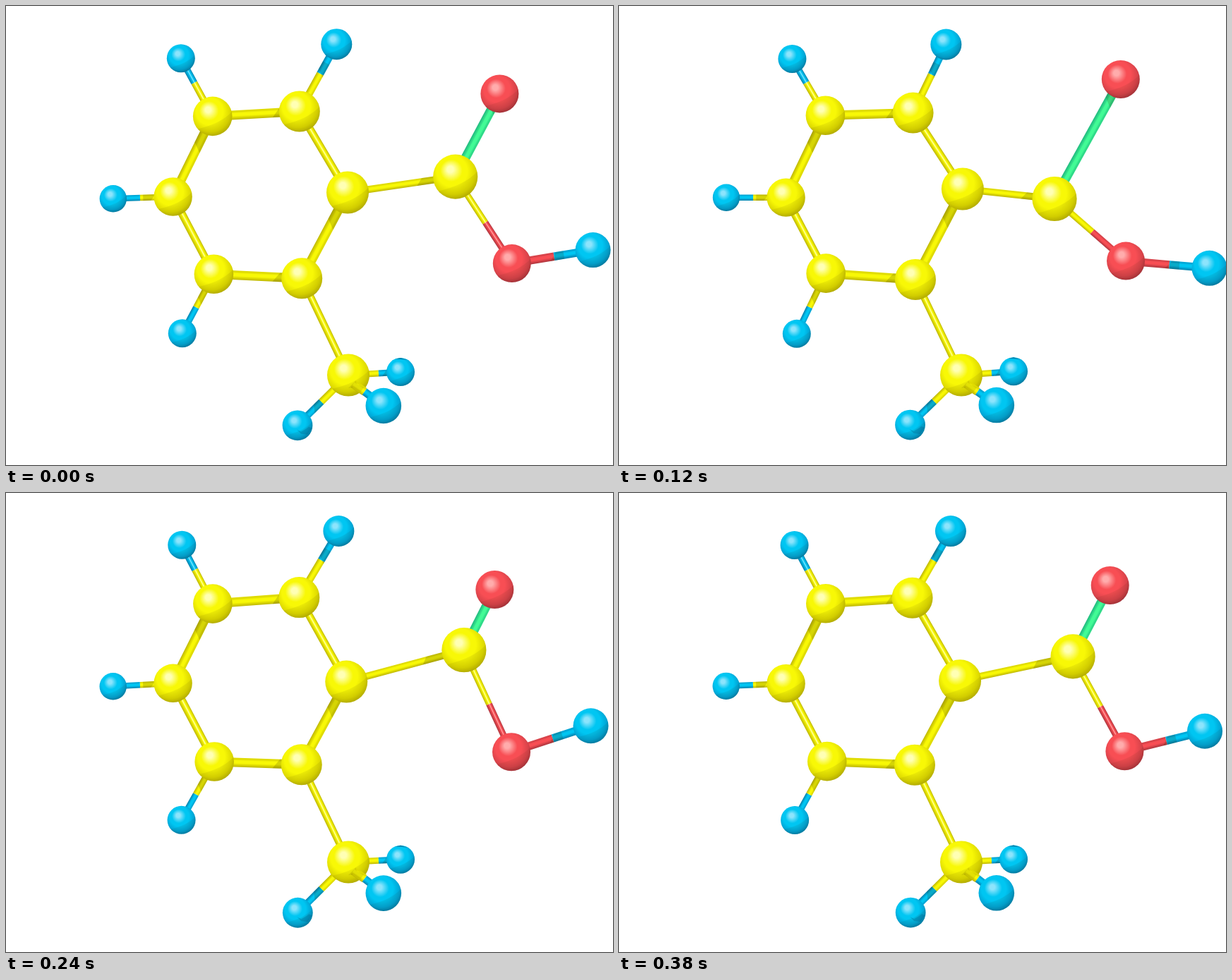
Animation, 860 px wide and 651 px high, one loop 400 ms. Source, as an HTML page with a canvas:

```html
<!DOCTYPE html>
<html lang="en">
<head>
<meta charset="utf-8">
<title>Molecular vibration</title>
<style>
html, body { margin: 0; width: 100%; height: 100%; overflow: hidden; background: #fff; }
canvas { display: block; }
</style>
</head>
<body>
<canvas id="stage" width="860" height="651"></canvas>
<script>
const ctx = document.getElementById('stage').getContext('2d');
const LOOP = 400, STEP = 20;

const palette = {
  C: { main: '#f8f806', dark: '#bdb600', mid: '#dfdb00', pale: '#ffffb4' },
  H: { main: '#00c6f2', dark: '#0080aa', mid: '#00a6d6', pale: '#8ce4fc' },
  O: { main: '#f84e54', dark: '#ac343c', mid: '#d8434a', pale: '#ffacac' },
  double: { main: '#42fb96', dark: '#20b87f', mid: '#2fda88', pale: '#5cffa8' }
};

// Rest position, radius and vibration amplitude.
const atom = (kind, x, y, r, dx, dy) => ({ kind, x, y, r, dx, dy });
const atoms = {
  h1: atom('H', 247.8, 74.2, 20, -2.5, 0.8),
  h2: atom('H', 468.3, 54.2, 22, -5.2, 0.3),
  h3: atom('H', 151.8, 273.3, 19.2, 0.2, -1.7),
  h4: atom('H', 249.8, 464.2, 20, 2.1, 0.7),
  c1: atom('C', 292.7, 156.4, 27.8, -0.3, -1.2),
  c2: atom('C', 415.8, 149.4, 29, 0.8, 2.2),
  c3: atom('C', 236.6, 270.5, 27.2, 0, 1.2),
  c4: atom('C', 294.4, 380.3, 27.8, -1.3, -1.2),
  c5: atom('C', 419.2, 386.2, 29, 0.8, 1.8),
  c6: atom('C', 484, 264.5, 30, 3, -5.3),
  c8: atom('C', 485, 523.5, 30, 0, 0),
  o1: atom('O', 699.4, 124.4, 27, 12, -21.5),
  c7: atom('C', 636.7, 242.1, 31.6, -20.7, 33),
  o2: atom('O', 716.8, 365.1, 27, 1.3, -3.7),
  h5: atom('H', 831.6, 346.1, 25, 5.2, 27),
  h6: atom('H', 559, 519.1, 20, 0, -1),
  h8: atom('H', 413, 594.8, 21.4, -0.5, -0.8),
  h7: atom('H', 534.8, 567, 25.3, 0, -1)
};

// Ends, width, colour split and shaded span along the bond.
const bond = (a, b, width, split, shade, tint) => ({ a, b, width, split, shade, tint });
const bonds = [
  bond('c1', 'c2', 13, 1, [0.72, 1]),
  bond('c3', 'c1', 13, 1, [0.6, 0.8]),
  bond('c3', 'c4', 11, 1),
  bond('c4', 'c5', 13, 1, [0.7, 1]),
  bond('c5', 'c6', 13.5, 1, [0.62, 0.8]),
  bond('c2', 'c6', 11, 1),
  bond('c5', 'c8', 10, 1),
  bond('c6', 'c7', 10, 1, [0.66, 1]),
  bond('c7', 'o1', 13, 1, [0.8, 1], 'double'),
  bond('c7', 'o2', 9, 0.53),
  bond('o2', 'h5', 11.5, 0.52, [0.5, 0.64]),
  bond('c1', 'h1', 9.5, 0.58),
  bond('c2', 'h2', 10.5, 0.56, [0.56, 0.72]),
  bond('c3', 'h3', 8.5, 0.55, [0.32, 0.5]),
  bond('h4', 'c4', 9, 0.44, [0.54, 0.8]),
  bond('c8', 'h6', 9, 0.58, [0.68, 0.8]),
  bond('h8', 'c8', 10, 0.47, [0.32, 0.47])
];

function tube(p, q, width, color, shiny) {
  const len = Math.hypot(q.x - p.x, q.y - p.y);
  let nx = -(q.y - p.y) / len, ny = (q.x - p.x) / len;
  if (nx - 0.9 * ny < 0) { nx = -nx; ny = -ny; }
  nx *= width / 2;
  ny *= width / 2;
  const g = ctx.createLinearGradient(p.x - nx, p.y - ny, p.x + nx, p.y + ny);
  g.addColorStop(0, color.dark);
  g.addColorStop(0.25, color.mid);
  g.addColorStop(0.42, color.main);
  g.addColorStop(0.52, shiny ? color.pale : color.main);
  g.addColorStop(0.68, color.main);
  g.addColorStop(0.85, color.mid);
  g.addColorStop(1, shiny ? color.dark : color.mid);
  ctx.fillStyle = g;
  ctx.beginPath();
  ctx.moveTo(p.x - nx, p.y - ny);
  ctx.lineTo(q.x - nx, q.y - ny);
  ctx.lineTo(q.x + nx, q.y + ny);
  ctx.lineTo(p.x + nx, p.y + ny);
  ctx.fill();
}

function drawBond({ a, b, width, split, shade, tint }, at) {
  const p = at[a], q = at[b];
  const point = t => ({ x: p.x + (q.x - p.x) * t, y: p.y + (q.y - p.y) * t });
  const shiny = (q.x - p.x) * (q.y - p.y) > 0 && Math.abs(q.y - p.y) > Math.abs(q.x - p.x);
  tube(p, point(split), width, palette[tint || atoms[a].kind], shiny);
  if (split < 1) tube(point(split), q, width, palette[atoms[b].kind], shiny);
  if (!shade) return;
  const len = Math.hypot(q.x - p.x, q.y - p.y);
  ctx.save();
  ctx.translate(p.x, p.y);
  ctx.rotate(Math.atan2(q.y - p.y, q.x - p.x));
  ctx.fillStyle = 'rgba(45,40,0,.17)';
  ctx.beginPath();
  ctx.moveTo(len * shade[0] + width * 0.5, -width / 2);
  ctx.lineTo(len * shade[1], -width / 2);
  ctx.lineTo(len * shade[1], width / 2);
  ctx.lineTo(len * shade[0] - width * 0.3, width / 2);
  ctx.fill();
  ctx.restore();
}

function drawAtom({ kind, r }, { x, y }) {
  const c = palette[kind];
  ctx.save();
  ctx.translate(x, y);
  ctx.scale(r, r);
  ctx.beginPath();
  ctx.arc(0, 0, 1, 0, Math.PI * 2);
  const g = ctx.createRadialGradient(-0.25, -0.35, 0, -0.08, -0.17, 1.18);
  g.addColorStop(0, c.pale);
  g.addColorStop(0.12, c.pale);
  g.addColorStop(0.42, c.main);
  g.addColorStop(0.58, c.main);
  g.addColorStop(0.84, c.mid);
  g.addColorStop(1, c.dark);
  ctx.fillStyle = g;
  ctx.fill();
  ctx.clip();
  ctx.fillStyle = 'rgba(50,40,0,.07)';
  ctx.beginPath();
  ctx.moveTo(-0.8, 0.65);
  ctx.quadraticCurveTo(0.4, 0.4, 1, -0.25);
  ctx.lineTo(1, 1);
  ctx.lineTo(-0.8, 1);
  ctx.fill();
  ctx.restore();
}

function patch({ x, y }, points, color) {
  ctx.fillStyle = color;
  ctx.beginPath();
  for (const [px, py] of points) ctx.lineTo(x + px, y + py);
  ctx.fill();
}

function drawMethylFront(at) {
  const start = { x: 492, y: 536 }, joint = { x: 508, y: 547 };
  tube(start, joint, 12, palette.C, false);
  patch(start, [[-7, 6], [3, -4], [6, 1], [15, 5], [10, 12], [0, 5]], 'rgba(110,100,0,.16)');
  tube(joint, at.h7, 11, palette.H, false);
}

function draw(time) {
  const swing = Math.sin(2 * Math.PI * Math.floor(time % LOOP / STEP) * STEP / LOOP);
  const at = {};
  for (const [name, a] of Object.entries(atoms)) {
    at[name] = { x: a.x + a.dx * swing, y: a.y + a.dy * swing };
  }
  ctx.fillStyle = '#fff';
  ctx.fillRect(0, 0, 860, 651);
  for (const b of bonds) drawBond(b, at);
  for (const name in atoms) {
    if (name === 'h7') drawMethylFront(at);
    drawAtom(atoms[name], at[name]);
  }
  patch(at.h6, [[-8, -18], [0, -20], [10, -17], [0, -18]], palette.H.dark);
  patch(at.h8, [[-1, 6], [5, 9], [12, 5], [16, 2], [20, 4], [14, 13], [5, 12]], 'rgba(0,65,100,.22)');
}

function tick() {
  draw(performance.now());
  requestAnimationFrame(tick);
}
tick();
</script>
</body>
</html>
```
